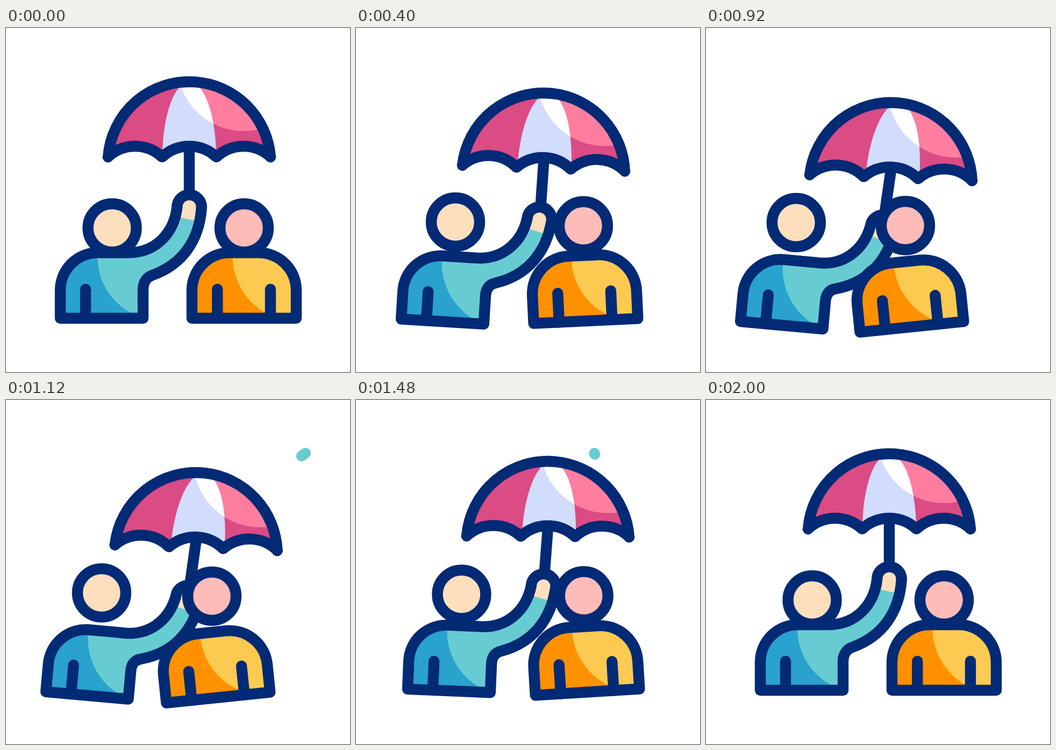
Animation of 640 by 640 pixels, one loop 2440 ms. Source, as an HTML page with a canvas:

```html
<!DOCTYPE html>
<html lang="en">
<head>
<meta charset="utf-8">
<title>Shared umbrella</title>
<style>
html, body { margin: 0; width: 100%; height: 100%; overflow: hidden; background: #fff; }
canvas { display: block; width: 100vmin; height: 100vmin; margin: 0 auto; }
</style>
</head>
<body>
<canvas id="stage" width="640" height="640"></canvas>
<script>
const ctx = document.getElementById('stage').getContext('2d');
const LOOP = 2440, STEP = 40, PI = Math.PI, DEG = PI / 180;
const NAVY = '#032a75', TEAL = '#67ccd1', BLUE = '#29a2ce', ORANGE = '#ff9100', YELLOW = '#fcca50',
  ROSE = '#db4b84', PINK = '#ff7d9f', LILAC = '#d2dcfc', SKIN = '#fddfbd', BLUSH = '#fdbcb8';

// Smooth track through [time, value] keys that never overshoots a key
function track(times, vals) {
  const n = times.length;
  const d = times.slice(1).map((t, i) => (vals[i + 1] - vals[i]) / (t - times[i]));
  const m = vals.map((v, i) => {
    if (i === 0 || i === n - 1 || d[i - 1] * d[i] <= 0) return 0;
    return 2 * d[i - 1] * d[i] / (d[i - 1] + d[i]);
  });
  return t => {
    if (t <= times[0]) return vals[0];
    if (t >= times[n - 1]) return vals[n - 1];
    let i = 0;
    while (t > times[i + 1]) i++;
    const h = times[i + 1] - times[i], u = (t - times[i]) / h, w = 1 - u;
    return vals[i] * (1 + 2 * u) * w * w + m[i] * h * u * w * w +
      vals[i + 1] * u * u * (3 - 2 * u) - m[i + 1] * h * u * u * w;
  };
}

const TIMES = [40, 400, 600, 920, 1280, 1680, 1960];
const part = (...rows) => rows.map(r => track(TIMES, [0, ...r, 0]));

const helper = part([-17.1, -33.6, -37.2, -37.2, 0], [6.2, 12.2, 13, 12.5, 0], [3.5, 5.2, 5.2, 4.9, 0]);
const helperHead = part([-12.5, -26.5, -29.7, -29.5, .2], [-11, -11, -10, -10, -.7]);
const canopy = part([8, 5.5, 3, 2.5, 2.5], [21, 36.8, 38.7, 37.2, 1], [2.1, 2.5, 2.1, 1.9, -1.1]);
const friend = part([-15.5, -44.5, -60, -54.5, 0], [5.1, 12.2, 16, 17, -.2], [-2.7, -5.8, -5.8, -5.9, -.7]);
const friendHead = part([-20, -56, -72, -66, -1.5], [-4, -8, -4.5, -3.5, -2]);
const armBend = part([2.5, 3.4, 3.5, 3.8, .3])[0];

// Shift of the whole scene
const SHIFT = [920, 1000, 1160, 1280, 1680];
const shiftX = track(SHIFT, [0, -2, 15, 27, 0]);
const shiftY = track(SHIFT, [0, 1, -5, -10, 0]);

function ease(t, start, length) {
  const u = Math.min(1, Math.max(0, (t - start) / length));
  return u * u * (3 - 2 * u);
}

function turn(x, y, cx, cy, a) {
  const c = Math.cos(a), s = Math.sin(a);
  return [cx + (x - cx) * c - (y - cy) * s, cy + (x - cx) * s + (y - cy) * c];
}

function pose(p, cx, cy, t) {
  return {
    cx, cy, x: p[0](t) + shiftX(t), y: p[1](t) + shiftY(t),
    a: p[2] ? p[2](t) * DEG : 0
  };
}

function place(q, x, y) {
  const [px, py] = turn(x, y, q.cx, q.cy, q.a);
  return [px + q.x, py + q.y];
}

function inPose(q, draw) {
  ctx.save();
  ctx.translate(q.cx + q.x, q.cy + q.y);
  ctx.rotate(q.a);
  ctx.translate(-q.cx, -q.cy);
  draw();
  ctx.restore();
}

function ink(path) {
  ctx.strokeStyle = NAVY;
  ctx.stroke(path);
}

function line(x1, y1, x2, y2) {
  const p = new Path2D();
  p.moveTo(x1, y1);
  p.lineTo(x2, y2);
  return p;
}

function disc(x, y, r, color) {
  ctx.fillStyle = color;
  ctx.beginPath();
  ctx.arc(x, y, r, 0, 2 * PI);
  ctx.fill();
}

function paint(path, inside) {
  ctx.save();
  ctx.clip(path);
  inside();
  ctx.restore();
  ink(path);
}

function flood(color) {
  ctx.fillStyle = color;
  ctx.fillRect(0, 0, 640, 640);
}

function head(q, color) {
  inPose(q, () => {
    disc(q.cx, q.cy, 45, color);
    const p = new Path2D();
    p.arc(q.cx, q.cy, 45, 0, 2 * PI);
    ink(p);
  });
}

function drawHelper(q, bend) {
  const b = (x, y, k = 1) => turn(x, y, 205, 460, bend * k);
  const p = new Path2D();
  p.moveTo(101, 540);
  p.lineTo(101, 488);
  p.arc(171, 488, 70, PI, 1.5 * PI);
  p.lineTo(228, 418);
  p.bezierCurveTo(...b(280, 418, .8), ...b(313, 380), ...b(318.3, 333));
  p.arc(...b(341, 333), 22.8, PI + bend, 2 * PI + bend);
  p.bezierCurveTo(...b(360, 395), ...b(328, 440), ...b(272, 460, .8));
  p.bezierCurveTo(...b(260, 464, .6), 255, 475, 255, 487);
  p.lineTo(255, 540);
  p.closePath();
  inPose(q, () => {
    paint(p, () => {
      flood(BLUE);
      disc(290, 425, 120, TEAL);
      ctx.fillStyle = SKIN;
      ctx.beginPath();
      ctx.moveTo(...b(300, 348));
      ctx.lineTo(...b(375, 363));
      ctx.lineTo(...b(380, 300));
      ctx.lineTo(...b(300, 300));
      ctx.fill();
    });
    ink(line(148, 486, 148, 540));
  });
  return place(q, ...b(341, 314));
}

function drawFriend(q) {
  const p = new Path2D();
  p.moveTo(346, 540);
  p.lineTo(346, 488);
  p.arc(416, 488, 70, PI, 1.5 * PI);
  p.arc(470, 488, 70, 1.5 * PI, 2 * PI);
  p.lineTo(540, 540);
  p.closePath();
  inPose(q, () => {
    paint(p, () => {
      flood(ORANGE);
      disc(542, 425, 120.5, YELLOW);
    });
    ink(line(393.3, 486, 393.3, 540));
    ink(line(492, 486, 492, 540));
  });
}

// The panels lean with the helper, a little more than the rim does
function drawCanopy(q, lean) {
  const p = new Path2D();
  const rim = Math.asin(11.4 / 151.4), half = Math.asin(50.3 / 73.8);
  p.arc(341, 251.4, 151.4, PI + rim, -rim);
  for (const x of [442, 341, 240]) p.arc(x, 293.8, 73.8, -PI / 2 + half, -PI / 2 - half, true);
  p.closePath();
  const panel = new Path2D();
  panel.ellipse(341, 240, 50, 140, 0, 0, 2 * PI);
  inPose(q, () => paint(p, () => {
    flood(ROSE);
    inPose({ cx: 341, cy: 290, x: 0, y: 0, a: lean - q.a }, () => {
      disc(443, 67, 125, PINK);
      ctx.clip(panel);
      flood(LILAC);
      disc(443, 67, 125, '#fff');
    });
  }));
}

// A streak comes down, hits the canopy and bounces away
function drawStreak(t) {
  const tip = 171 * ease(t, 1080, 290), tail = 171 * ease(t, 1220, 280);
  if (tip - tail < .5) return;
  const p = line(557, 99, 475, 160);
  p.lineTo(443.5, 99);
  ctx.save();
  ctx.strokeStyle = TEAL;
  ctx.setLineDash([tip - tail, 1000]);
  ctx.lineDashOffset = -tail;
  ctx.stroke(p);
  ctx.restore();
}

function drawSparks(t) {
  const far = 42 + 20.5 * ease(t, 1480, 160), near = 42 + 20.5 * ease(t, 1580, 190);
  if (far - near < .3) return;
  ctx.strokeStyle = TEAL;
  for (const a of [-1.286, -.64, .035]) {
    const c = Math.cos(a), s = Math.sin(a);
    ctx.stroke(line(457 + near * c, 178 + near * s, 457 + far * c, 178 + far * s));
  }
}

function render(t) {
  flood('#fff');
  ctx.lineWidth = 20.4;
  ctx.lineCap = ctx.lineJoin = 'round';
  const top = pose(canopy, 341, 240, t);
  const body = pose(helper, 178, 540, t);
  const hand = drawHelper(body, armBend(t) * DEG);
  head(pose(helperHead, 197.5, 372, t), SKIN);
  ctx.lineCap = 'butt';
  ink(line(...place(top, 341, 222), ...hand));
  ctx.lineCap = 'round';
  drawCanopy(top, body.a);
  drawFriend(pose(friend, 443, 540, t));
  head(pose(friendHead, 443, 372, t), BLUSH);
  ctx.lineWidth = 20;
  drawStreak(t);
  drawSparks(t);
}

const begin = performance.now();
function tick() {
  const t = (performance.now() - begin) % LOOP;
  render(Math.floor(t / STEP) * STEP);
  requestAnimationFrame(tick);
}
tick();
</script>
</body>
</html>
```
